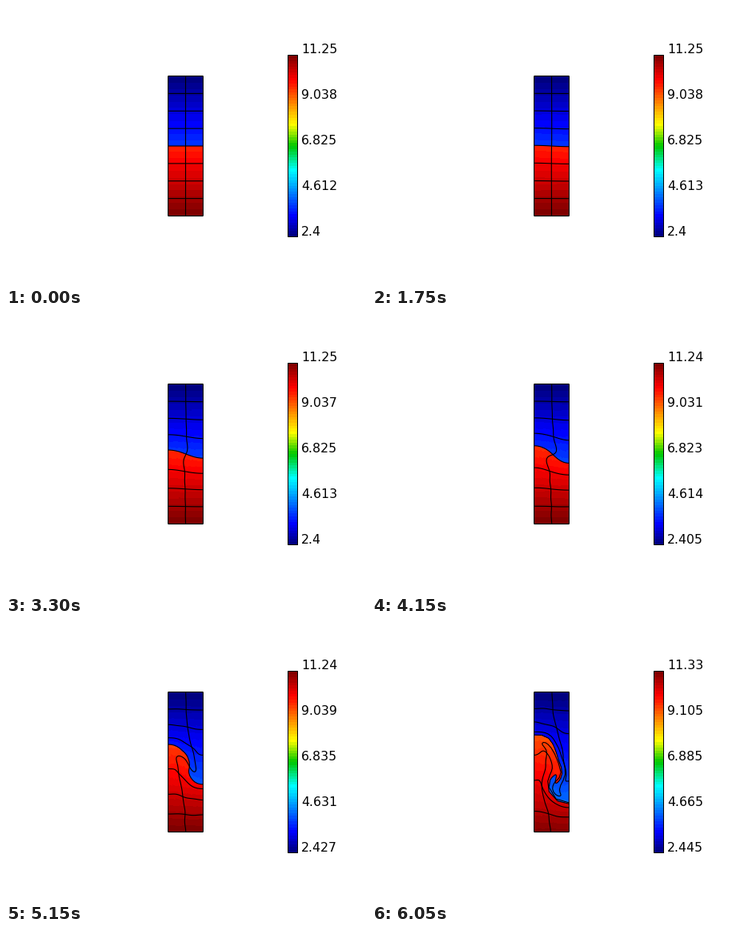
Recreate the animation shown at these times as a matplotlib script. Size 450 by 350 pixels, loop 7100 ms.

```python
import numpy as np
import matplotlib.pyplot as plt
from matplotlib.animation import FuncAnimation
from matplotlib.collections import LineCollection
from matplotlib.colors import LinearSegmentedColormap
from matplotlib.patches import Rectangle

WIDTH, HEIGHT = 450, 350
FRAMES, INTERVAL = 142, 50
HOLD, STEPS = 21, 100

# Rayleigh-Taylor instability in a box 0.5 wide and 2 high, heavy fluid on top
CELL = 16
NX, NY = 2 * CELL, 8 * CELL
MID = NY // 2
SCALE = 87.5
CENTER_X, CENTER_Y = 224.5, 175
DT = 0.04
HEAVY, LIGHT = 2.5, 1.0

# progress, height difference of the interface between the walls (px), value range
KEY_STEP = [0, 1, 27, 45, 62, 82, 100]
KEY_GAP = [0, 0.08, 3.7, 10.2, 21.7, 50, 85]
KEY_LOW = [2.39995, 2.4001, 2.3993, 2.4004, 2.405, 2.427, 2.445]
KEY_HIGH = [11.25005, 11.25, 11.2525, 11.2492, 11.2401, 11.243, 11.3252]

x0, y0 = np.meshgrid(np.linspace(0, 0.5, NX + 1), np.linspace(-1, 1, NY + 1))


def particle_mass():
    """Density times trapezoid weights, repeated for both velocity components."""
    mass = np.full(y0.shape, LIGHT)
    mass[MID] = (HEAVY + LIGHT) / 2
    mass[MID + 1:] = HEAVY
    mass[[0, -1]] /= 2
    mass[:, [0, -1]] /= 2
    return np.tile(mass.ravel(), 2)


# Smooth divergence-free modes that fit the walls
CUT = 4.3
m_all, n_all = np.arange(1, 5), np.arange(1, 18)
mi, ni = np.nonzero((m_all[:, None] / CUT) ** 2 + (n_all / (4 * CUT)) ** 2 < 1)
kx, ky = 2 * np.pi * m_all[mi], np.pi / 2 * n_all[ni]
k = np.hypot(kx, ky)


def basis(x, y):
    px = np.outer(x, 2 * np.pi * m_all)
    py = np.outer(y + 1, np.pi / 2 * n_all)
    u = np.sin(px)[:, mi] * np.cos(py)[:, ni] * (ky / k)
    v = np.cos(px)[:, mi] * np.sin(py)[:, ni] * (-kx / k)
    return np.vstack([u, v])


def simulate():
    """Move massive particles, projecting their velocity on the modes each step."""
    mass = particle_mass()
    root = np.sqrt(mass)[:, None]
    damping = np.diag(0.05 * mass.sum() / 8 * (k / (2 * np.pi * CUT)) ** 6)
    pos = np.concatenate([x0.ravel(), y0.ravel()])
    push = 0.02 * np.exp(-2 * np.pi * y0 ** 2) * np.cos(2 * np.pi * x0)
    vel = np.concatenate([0 * x0.ravel(), push.ravel()])
    fall = np.repeat([0, -DT], x0.size)
    path, gaps, old = [pos.reshape(2, NY + 1, NX + 1)], [0.0], None
    while gaps[-1] < KEY_GAP[-1] and len(path) < 220:
        modes = basis(*pos.reshape(2, -1))
        heavy_modes = modes * root
        amount = np.linalg.solve(heavy_modes.T @ heavy_modes + damping,
                                 modes.T @ (mass * vel))
        vel = modes @ amount
        old = vel if old is None else old
        pos = pos + DT * (1.5 * vel - 0.5 * old)
        old = vel
        vel = vel + fall
        grid = pos.reshape(2, NY + 1, NX + 1)
        path.append(grid)
        gaps.append(SCALE * (grid[1, MID, 0] - grid[1, MID, -1]))
    return path, np.maximum.accumulate(gaps)


path, gaps = simulate()
key_time = np.interp(KEY_GAP, gaps, np.arange(len(gaps)))


def grid_at(step):
    time = np.interp(step, KEY_STEP, key_time)
    i = min(int(time), len(path) - 2)
    return path[i] + (time - i) * (path[i + 1] - path[i])


def cell_mean(a):
    return (a[1:, 1:] + a[:-1, 1:] + a[1:, :-1] + a[:-1, :-1]) / 4


def energy(y):
    base = np.where(cell_mean(y0) > 0, 3.9, 9.75)
    return base - 0.5 * cell_mean(y0) - cell_mean(y)


palette = LinearSegmentedColormap.from_list("palette", [
    (0, (0, 0, 0.5)), (0.11, (0, 0, 1)), (0.365, (0, 1, 1)), (0.5, (0, 0.78, 0)),
    (0.62, (1, 1, 0)), (0.87, (1, 0, 0)), (1, (0.5, 0, 0))], N=64)

fig = plt.figure(figsize=(WIDTH / 100, HEIGHT / 100), dpi=100, facecolor="white")
ax = fig.add_axes([0, 0, 1, 1])
ax.axis("off")
ax.set_autoscale_on(False)
ax.set_xlim(0, WIDTH)
ax.set_ylim(HEIGHT, 0)

ax.pcolormesh([352.5, 364.5], np.linspace(288.5, 61.5, 65),
              np.linspace(0, 1, 64)[:, None], cmap=palette, vmin=0, vmax=1,
              antialiased=False)
ax.add_patch(Rectangle((352, 61), 12, 227, fill=False, ec="black", lw=0.72))

labels = [ax.text(369, 287 - 57 * i, "", family="DejaVu Sans", fontsize=11.35,
                  va="baseline") for i in range(5)]
lines = LineCollection([], colors="black", linewidths=0.8, zorder=3, snap=False)
ax.add_collection(lines, autolim=False)
fluid = None


def draw(frame):
    global fluid
    step = min(max(frame - HOLD, 0), STEPS)
    x, y = grid_at(step)
    sx, sy = CENTER_X + SCALE * (x - 0.25), CENTER_Y - SCALE * y
    low, high = (np.interp(step, KEY_STEP, key) for key in (KEY_LOW, KEY_HIGH))

    if fluid is not None:
        fluid.remove()
    fluid = ax.pcolormesh(sx, sy, energy(y), cmap=palette, vmin=low, vmax=high,
                          shading="flat", antialiased=False, zorder=1)
    points = np.dstack([sx, sy])
    lines.set_segments([points[j] for j in range(0, NY + 1, CELL)]
                       + [points[:, i] for i in range(0, NX + 1, CELL)])
    for i, label in enumerate(labels):
        label.set_text(f"{low + (high - low) * i / 4:.4g}")
    return [fluid, lines, *labels]


anim = FuncAnimation(fig, draw, frames=FRAMES, interval=INTERVAL, repeat=True,
                     repeat_delay=0, blit=False)
plt.show()
```
